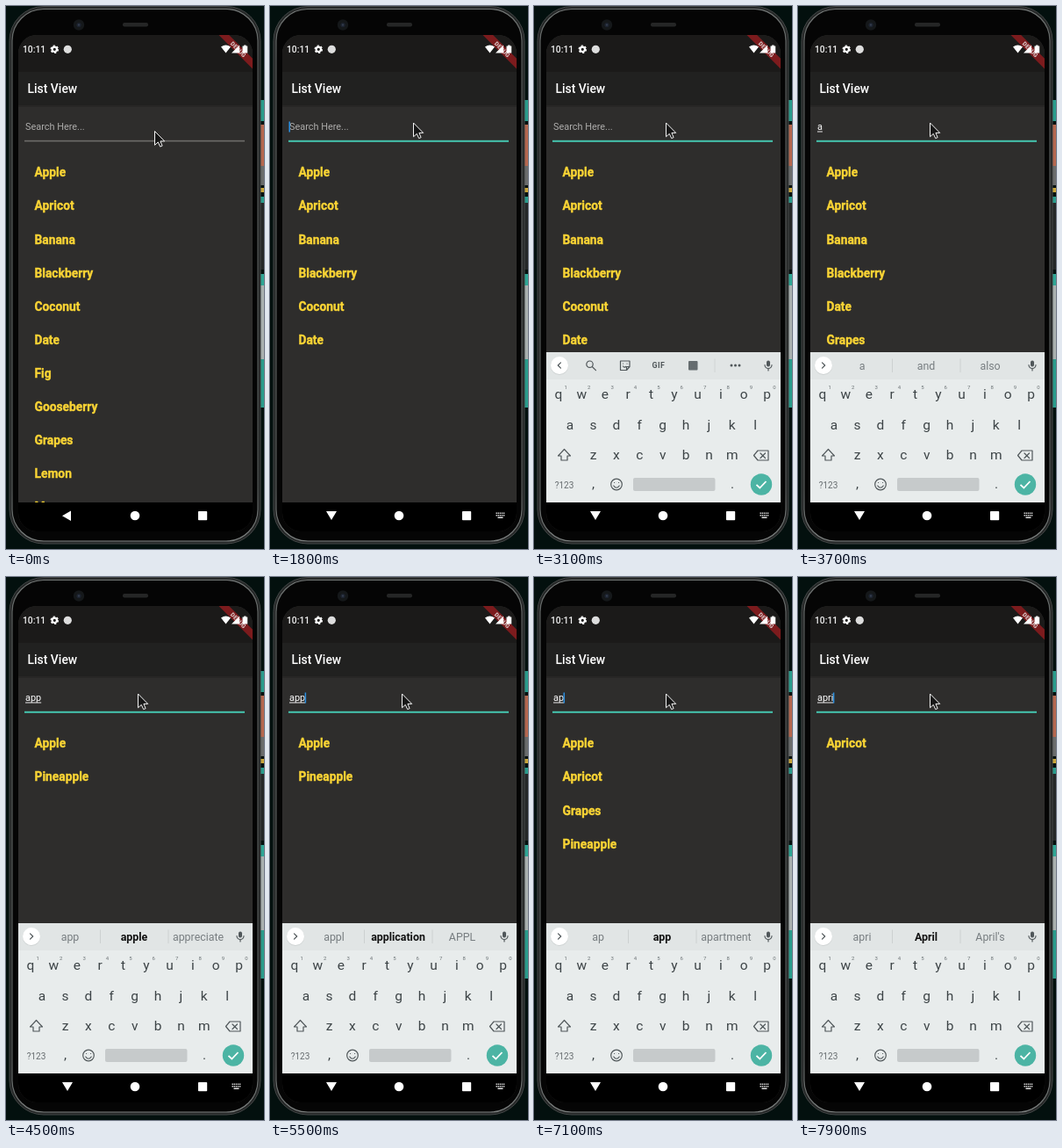
Write an HTML page that moves like this. It is 294 px wide and 618 px high and loops after 8000 ms.

```html
<!DOCTYPE html>
<html lang="en">
<head>
<meta charset="utf-8">
<title>List search</title>
<style>
html, body { margin: 0; width: 100%; height: 100%; overflow: hidden; background: #03100e; }
svg { display: block; width: 100vw; height: 100vh; font-family: Roboto, sans-serif; }
.mid { text-anchor: middle; }
.line { fill: none; stroke: #50575a; stroke-width: 1.2; stroke-linejoin: round; stroke-linecap: round; }
.item { fill: #fbd535; stroke: #fbd535; stroke-width: .35; font-size: 13.8px; font-weight: 700; }
.key { fill: #3d4447; font-size: 15.5px; }
.num { fill: #6b7275; font-size: 6px; }
.small { fill: #666c6f; font-size: 10px; }
</style>
</head>
<body>
<svg id="stage" viewBox="0 0 294 618">
  <defs>
    <clipPath id="screenClip"><rect x="14" y="33" width="267" height="565" rx="21"/></clipPath>
    <clipPath id="listClip"><rect id="listBox" x="14" y="156" width="267" height="409"/></clipPath>
    <linearGradient id="rim" x1="0" y1="0" x2="0" y2="1">
      <stop offset="0" stop-color="#747877"/><stop offset=".1" stop-color="#565a59"/>
      <stop offset=".9" stop-color="#565a59"/><stop offset="1" stop-color="#7d8180"/>
    </linearGradient>
  </defs>
  <rect width="294" height="618" fill="#03100e"/>
  <g id="behind"></g>

  <rect x="4" y=".5" width="286" height="611.5" rx="39" fill="#252727" stroke="#434646"/>
  <rect x="7" y="3.5" width="280" height="605.5" rx="36" fill="#050505" stroke="url(#rim)" stroke-width="1.2"/>
  <circle cx="83" cy="21.5" r="6.2" fill="#15181a"/>
  <circle cx="83" cy="21.5" r="2.6" fill="#1d2430"/>
  <circle cx="83" cy="21.5" r="1" fill="#3b4454"/>
  <rect x="133" y="19" width="29" height="4.5" rx="2" fill="#252626"/>

  <g clip-path="url(#screenClip)">
    <rect x="14" y="33" width="267" height="565" fill="#2e2d2c"/>
    <rect x="14" y="113" width="267" height="2" fill="#282726"/>
    <rect x="14" y="75" width="267" height="38" fill="#212120"/>
    <rect x="14" y="33" width="267" height="42" fill="#1b1a19"/>
    <g transform="translate(281 33) rotate(45)">
      <rect x="-40" y="19" width="80" height="8.2" fill="#7c1b1d"/>
      <text class="mid" y="25.5" font-size="6.8" font-weight="900" fill="#d9c4c4">DEBUG</text>
    </g>
    <text x="19" y="53.2" font-size="10.3" font-weight="500" fill="#f2f2f2">10:11</text>
    <circle cx="55.3" cy="49.3" r="2.7" fill="none" stroke="#fff" stroke-width="2.2"/>
    <circle cx="55.3" cy="49.3" r="4.2" fill="none" stroke="#fff" stroke-width="1.2" stroke-dasharray="2.2 2.2"/>
    <circle cx="70.3" cy="49.3" r="4.6" fill="#ddd"/>
    <path d="M245 46.5Q250.5 42.5 256 46.5L250.5 53.5ZM257 53.5L266 44.5V53.5ZM269.5 45.5h1.7v-1h2.300v1h1.700v8h-5.700Z" fill="#fff"/>
    <text x="24.5" y="99" font-size="13.9" font-weight="500" fill="#fff">List View</text>
    <text id="hint" x="22" y="141" font-size="10.9" fill="#adacab">Search Here...</text>
    <text id="typed" x="22" y="141" font-size="10.9" fill="#fff"></text>
    <rect id="under" x="22" y="142.500" height="1" fill="#e8e8e8"/>
    <rect id="caret" y="131.500" width="1.500" height="12" fill="#2b8fe0"/>
    <rect id="rule" x="21" y="152.800" width="251"/>
    <g id="list" clip-path="url(#listClip)"></g>
    <g id="board"></g>
    <rect x="14" y="565" width="267" height="33" fill="#000"/>
    <path id="back" fill="#fff"/>
    <circle cx="147" cy="580" r="5.3" fill="#fff"/>
    <rect x="219" y="575" width="10.2" height="10.2" rx=".8" fill="#fff"/>
    <g id="switch" stroke="#ddd" stroke-width="1.4">
      <path d="M257.500 577.200H267.500M257.500 579.700H267.500" stroke-dasharray="1.400 .7"/>
      <path d="M259.500 582.300H265.500"/>
    </g>
  </g>
  <path id="mouse" d="M0 0V15.800L3.800 12.400L6.200 17.600L8.600 16.600L6.400 11.400H11.200Z" fill="#161616" stroke="#f4f4f4" stroke-linejoin="round"/>
</svg>
<script>
const LOOP = 8000;
const $ = id => document.getElementById(id);
const el = (tag, attrs, parent, text = '') => {
  const node = document.createElementNS('http://www.w3.org/2000/svg', tag);
  for (const k in attrs) node.setAttribute(k, attrs[k]);
  node.textContent = text;
  parent.append(node);
  return node;
};
const set = (id, attrs) => { for (const k in attrs) $(id).setAttribute(k, attrs[k]); };
const show = (node, on) => node.setAttribute('visibility', on ? 'inherit' : 'hidden');

const fruits = ['Apple', 'Apricot', 'Banana', 'Blackberry', 'Coconut', 'Date', 'Fig',
  'Gooseberry', 'Grapes', 'Lemon', 'Mango', 'Orange', 'Pineapple'];

// strip: three suggestions, and whether the middle one is emphasised
const hints = {
  a: ['a', 'and', 'also', false],
  ap: ['ap', 'app', 'apartment', true],
  app: ['app', 'apple', 'appreciate', true],
  appl: ['appl', 'application', 'APPL', true],
  apr: ['apr', 'April', 'apricot', true],
  apri: ['apri', 'April', "April's", true]
};

// time, typed text, strip, caret shown
const steps = [
  [0, '', 'plain', 0], [800, '', 'plain', 1], [1300, '', 'plain', 0], [1700, '', 'plain', 1],
  [2000, '', 'tools', 1], [2100, '', 'tools', 0], [2500, '', 'tools', 1], [3100, '', 'tools', 0],
  [3300, 'a', 'tools', 1], [3700, 'a', 'a', 0], [3800, 'ap', 'a', 1], [3900, 'app', 'ap', 1],
  [4000, 'app', 'app', 1], [4500, 'app', 'app', 0], [4700, 'appl', 'app', 1],
  [4900, 'appl', 'appl', 1], [5200, 'appl', 'appl', 0], [5400, 'app', 'appl', 1],
  [5700, 'ap', 'app', 1], [5800, 'ap', 'ap', 1], [5900, 'a', 'ap', 1], [6000, 'a', 'a', 1],
  [6200, '', 'a', 1], [6400, '', 'tools', 1], [6700, 'a', 'tools', 1], [6800, 'a', 'a', 1],
  [6900, 'ap', 'a', 1], [7100, 'ap', 'ap', 1], [7400, 'apr', 'ap', 1], [7500, 'apr', 'apr', 1],
  [7900, 'apri', 'apri', 1]
];
const mousePath = [[0, 169.5, 142.5], [1700, 168, 139], [1800, 163.5, 133], [1900, 150.5, 133]];
const at = (rows, t) => rows.filter(r => r[0] <= t).pop();

// windows peeking out beside the phone
[[107, 24, '#2a9c8c'], [135, 47, '#b5674f'], [182, 22, '#6a6c6c'], [207, 5, '#c9a63a'],
 [217, 7, '#2a9c8c'], [224, 76, '#242727'], [305, 13, '#2fa695'], [318, 84, '#a9b0af'],
 [402, 55, '#2a9c8c']].forEach(([y, height, fill]) =>
  el('rect', { x: 290, y, width: 4, height, fill }, $('behind')));

const rows = fruits.map((_, i) =>
  el('text', { class: 'item', x: 32.5, y: 194.3 + i * 38.1 }, $('list')));

const board = $('board');
el('rect', { x: 14, y: 394, width: 267, height: 171, fill: '#e8ecec' }, board);
const bar = el('rect', { x: 14, y: 394, width: 267, height: 31 }, board);
const keys = el('g', {}, board);
el('circle', { cx: 29, cy: 409.7, r: 10.2, fill: '#cfd3d3' }, keys);
el('circle', { cx: 29, cy: 409, r: 10, fill: '#fff' }, keys);
const chevron = el('path', { class: 'line' }, keys);
el('rect', { x: 265, y: 403.5, width: 4, height: 7, rx: 2, fill: '#50575a' }, keys);
el('path', { class: 'line', d: 'M263 408.5A4 4 0 0 0 271 408.5M267 412.5V415' }, keys);

const label = (x, y, text, cls, parent = keys, more = {}) =>
  el('text', { x, y, class: 'mid ' + cls, ...more }, parent, text);
[['qwertyuiop', 28, 447], ['asdfghjkl', 41, 481.5], ['zxcvbnm', 67.5, 515.5]].forEach(([letters, x0, y], row) =>
  [...letters].forEach((letter, i) => {
    const x = x0 + i * 26.4;
    label(x, y, letter, 'key');
    if (!row) label(x + 8.3, 436, (i + 1) % 10, 'num');
  }));
label(34.5, 548.5, '?123', 'small');
label(67.5, 549, ',', 'key');
label(226, 549, '.', 'key');
el('path', { class: 'line', d: 'M34.5 504.5L41.5 512H38V517H31V512H27.5Z' }, keys);
el('path', { class: 'line', d: 'M250.5 511.5L255 506H267V517H255ZM258 509L263.5 514.5M263.5 509L258 514.5' }, keys);
el('circle', { class: 'line', cx: 94, cy: 544.5, r: 6.3 }, keys);
el('path', { class: 'line', d: 'M91.5 542.5h.1M96.5 542.5h.1M90.8 546Q94 550.5 97.2 546' }, keys);
el('rect', { x: 113, y: 537, width: 93.5, height: 15, rx: 2, fill: '#c6cacb' }, keys);
el('circle', { cx: 259, cy: 544.5, r: 12.2, fill: '#4cb4a4' }, keys);
el('path', { d: 'M253.5 544.8L257.3 548.5L264.5 541', fill: 'none', stroke: '#fff', 'stroke-width': 1.8 }, keys);

const tools = el('g', {}, keys);
el('path', { class: 'line', d: 'M67.2 407.7A3.7 3.7 0 1 0 59.8 407.7A3.7 3.7 0 1 0 67.2 407.7M66.3 410.5L70.5 414.7' }, tools);
el('path', { class: 'line', d: 'M98.5 404H109V410.5L105.5 414.5H98.5ZM105.5 414.5V410.5H109M101.5 407h.1M106 407h.1M101.5 410Q103 412 104.5 410.5' }, tools);
label(142, 412, 'GIF', '', tools, { 'font-size': 8.8, 'font-weight': 700, fill: '#50575a', 'letter-spacing': .5 });
el('rect', { x: 176, y: 404, width: 10.5, height: 10.5, rx: 1, fill: '#656c6f' }, tools);
el('path', { d: 'M206 401.5V417', stroke: '#d0d4d4' }, tools);
[225, 229.5, 234].forEach(cx => el('circle', { cx, cy: 409, r: 1.5, fill: '#50575a' }, tools));

const words = el('g', {}, keys);
el('path', { d: 'M107.5 401.5V417M185 401.5V417', stroke: '#cdd1d1' }, words);
const slots = [73, 146, 219].map(x => label(x, 413.7, '', '', words, { 'font-size': 12.4 }));

function draw(t) {
  const [, text, strip, caret] = at(steps, t);
  const [, mx, my] = at(mousePath, t);
  const focused = t >= 700;
  const settled = t >= 2000;

  set('mouse', { transform: `translate(${mx} ${my})` });
  set('rule', {
    fill: !focused ? '#6d6c6a' : t < 800 ? '#5a9c8f' : '#45c4ae',
    height: focused ? 2 : 1.6
  });
  show($('hint'), !text);
  $('typed').textContent = text;
  const width = text ? $('typed').getComputedTextLength() : 0;
  set('under', { width });
  set('caret', { x: 21.5 + width });
  show($('caret'), caret);

  set('listBox', { height: t >= 1200 ? 238 : 409 });
  const found = fruits.filter(f => f.toLowerCase().includes(text));
  rows.forEach((row, i) => { row.textContent = found[i] || ''; });

  set('back', { d: t >= 1100 ? 'M64 575H76L70 585Z' : 'M74 574.5V586L64 580.2Z' });
  show($('switch'), t >= 1100);

  show(board, t >= 1900);
  keys.setAttribute('transform', `translate(0 ${settled ? 0 : 1})`);
  bar.setAttribute('fill', settled ? '#e1e5e5' : '#dcdfdf');
  chevron.setAttribute('d', strip === 'tools' ? 'M30.5 405.8L27.3 409L30.5 412.2' : 'M27.5 405.8L30.7 409L27.5 412.2');
  show(tools, strip === 'tools');
  const hint = hints[strip];
  show(words, hint);
  slots.forEach((slot, i) => {
    const strong = hint && hint[3] && i === 1;
    slot.textContent = hint ? hint[i] : '';
    slot.setAttribute('font-weight', strong ? 700 : 400);
    slot.setAttribute('fill', strong ? '#111' : '#777d80');
  });
}

const start = performance.now();
function tick() {
  draw((performance.now() - start) % LOOP);
  requestAnimationFrame(tick);
}
tick();
</script>
</body>
</html>
```
